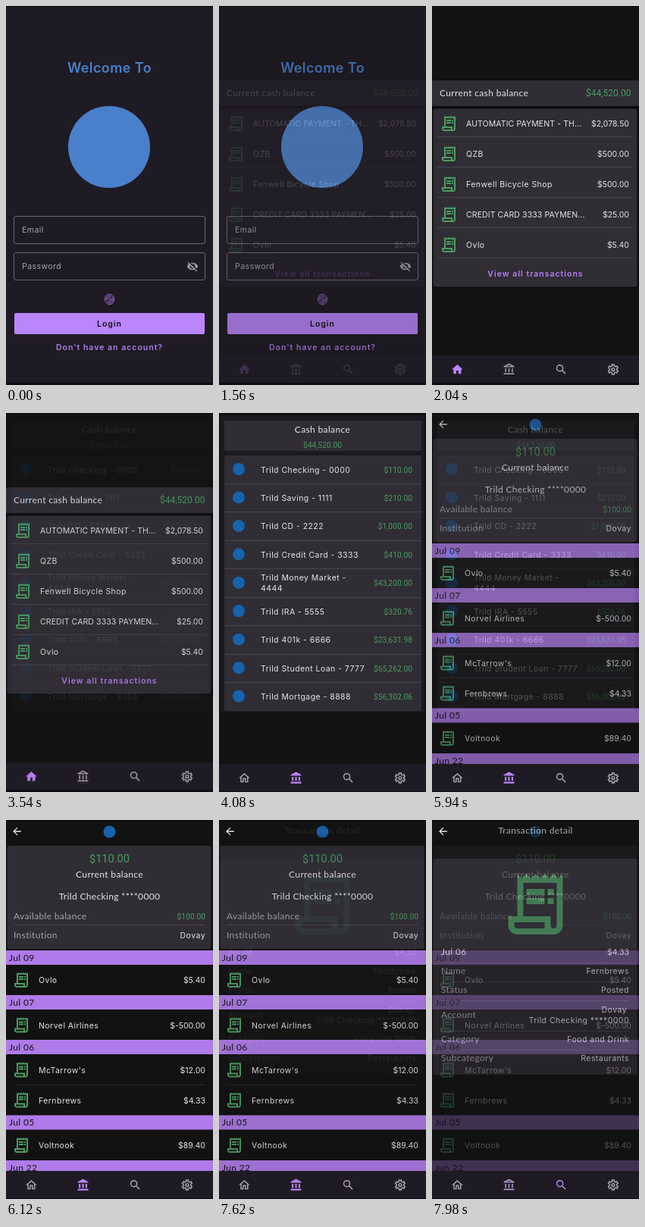
Write an HTML page that moves like this. It is 273 px wide and 500 px high and loops after 8000 ms.

```html
<!DOCTYPE html>
<html lang="en">
<head>
<meta charset="utf-8">
<title>Budget app tour</title>
<style>
  html, body { margin: 0; width: 100%; height: 100%; overflow: hidden; background: #121212; }
  svg { display: block; width: 100vw; height: 100vh; }
  .sans { font: 400 10.5px Inter, sans-serif; letter-spacing: .45px; }
  .tight { font: 400 10.5px Inter, sans-serif; letter-spacing: .1px; }
  .sum { font: 400 10.5px Inter, sans-serif; }
  .bold { font: 600 10.5px Inter, sans-serif; letter-spacing: 1px; }
  .title { font: 600 18px Inter, sans-serif; letter-spacing: .4px; }
  .label { font: 400 12px Lato, sans-serif; letter-spacing: .35px; }
  .cash { font: 400 10.3px Roboto, sans-serif; }
  .mid { font: 400 12px Roboto, sans-serif; }
  .big { font: 400 14.6px Roboto, sans-serif; }
</style>
</head>
<body>
<svg id="stage" viewBox="0 0 273 500"></svg>
<script>
const BG = '#121212', BAR = '#1f1b24', CARD = '#302d34', LINE = '#47444c';
const WHITE = '#e6e5e7', GREY = '#a5a3a8', GREEN = '#4c9c62', PURPLE = '#bb86fc';
const BAND = '#ae7be8', BANK_BLUE = '#1763ac', BLUE = '#4a80ca';
const BANK = 'Trild', BRANCH = 'Dovay';

const rect = (x, y, w, h, fill, r = 0) =>
  `<rect x="${x}" y="${y}" width="${w}" height="${h}" rx="${r}" fill="${fill}"/>`;
const box = (x, y, w, h) =>
  `<rect x="${x}" y="${y}" width="${w}" height="${h}" rx="2.5" fill="none" stroke="#6b676f"/>`;
const dot = (x, y, r, fill) => `<circle cx="${x}" cy="${y}" r="${r}" fill="${fill}"/>`;
const text = (s, x, y, cls, fill = WHITE, anchor = 'start') =>
  `<text x="${x}" y="${y}" class="${cls}" fill="${fill}" text-anchor="${anchor}">${s}</text>`;
const center = (s, y, cls, fill) => text(s, 136.5, y, cls, fill, 'middle');
const right = (s, x, y, cls, fill) => text(s, x, y, cls, fill, 'end');
const rule = (x, y, w) => rect(x, y, w, 1, LINE);

// Icons are drawn in a 24-unit box around (12, 12).
const icon = (art, x, y, size, color) =>
  `<g transform="translate(${x - size / 2} ${y - size / 2}) scale(${size / 24})" fill="${color}" color="${color}">${art}</g>`;
const fillPath = d => `<path fill-rule="evenodd" d="${d}"/>`;
const stroke = (d, w = 2) => `<path d="${d}" fill="none" stroke="currentColor" stroke-width="${w}"/>`;

function gear() {
  const pts = [];
  for (let i = 0; i < 6; i++) {
    for (const [turn, r] of [[-.27, 6.8], [-.2, 9.2], [.2, 9.2], [.27, 6.8]]) {
      const a = (i + turn) * Math.PI / 3;
      pts.push((12 + r * Math.sin(a)).toFixed(2) + ' ' + (12 - r * Math.cos(a)).toFixed(2));
    }
  }
  return stroke(`M${pts.join('L')}Z`) + '<circle cx="12" cy="12" r="2.6" fill="none" stroke="currentColor" stroke-width="2"/>';
}

const ridge = r =>
  `<ellipse cx="12" cy="12" rx="${r}" ry="${r * 1.1}" fill="none" stroke="currentColor" stroke-width="1.3" stroke-dasharray="${r * 2.6} 1.6"/>`;

const art = {
  receipt: fillPath('M19.5 3.5L18 2l-1.5 1.5L15 2l-1.5 1.5L12 2l-1.5 1.5L9 2 7.5 3.5 6 2v14H3v3c0 1.66 1.34 3 3 3h12c1.66 0 3-1.34 3-3V2zM15 20H6c-.55 0-1-.45-1-1v-1h10zM19 19c0 .55-.45 1-1 1s-1-.45-1-1v-3H8V5h11zM9 7h6v2H9zM16 7h2v2h-2zM9 10h6v2H9zM16 10h2v2h-2z'),
  home: fillPath('M10 20v-6h4v6h5v-8h3L12 3 2 12h3v8z'),
  homeLine: fillPath('M12 5.7l5 4.5V18h-2v-6H9v6H7v-7.8zM12 3L2 12h3v8h6v-6h2v6h6v-8h3z'),
  bank: fillPath('M4 10h3v7H4zM10 10h3v7h-3zM16 10h3v7h-3zM2 19h19v3H2zM11.5 1L2 6v2h19V6z'),
  bankLine: fillPath('M4.5 10h2v7h-2zM10.5 10h2v7h-2zM16.5 10h2v7h-2zM2 19h19v2H2zM11.5 3.3L16.7 6H6.3zM11.5 1L2 6v2h19V6z'),
  search: stroke('M4 9.5a5.5 5.5 0 1 1 11 0a5.5 5.5 0 1 1-11 0M13.5 13.5L19.7 19.7'),
  gear: gear(),
  back: stroke('M20 12H5M12.7 4.7L5.4 12l7.3 7.3'),
  eyeOff: fillPath('M1 12C4.5 2.5 19.5 2.5 23 12C19.5 21.5 4.5 21.5 1 12zM7 12a5 5 0 1 0 10 0a5 5 0 1 0-10 0') +
    '<circle cx="12" cy="12" r="3"/>' +
    `<path d="M4.2 2.2L21.8 19.8" stroke="${BAR}" stroke-width="2"/>` + stroke('M2.6 3.6L20.4 21.4'),
  finger: [1.7, 4.1, 6.5, 8.9].map(ridge).join('')
};

function nav(active, y) {
  const icons = [
    active === 0 ? art.home : art.homeLine,
    active === 1 ? art.bank : art.bankLine,
    art.search, art.gear
  ];
  return rect(0, y, 273, 36, BAR) + rect(0, y + 36, 273, 464 - y, '#0d0c0f') +
    icons.map((a, i) => icon(a, 33.4 + 68.5 * i, y + 18.5, 17.5, i === active ? PURPLE : '#aaa8ad')).join('');
}

const base = color => rect(0, 0, 273, 500, color) + rect(0, 0, 273, 1, '#09090a');
const receipt = (x, y) => icon(art.receipt, x, y, 24, GREEN);
const back = () => icon(art.back, 14.5, 15, 16, WHITE);

function login() {
  return base(BAR) + rect(0, 497, 273, 3, '#0d0c0f') +
    center('Welcome To', 88, 'title', BLUE) +
    dot(136, 186, 54, BLUE) +
    box(10.5, 277.5, 252, 36) + text('Email', 21, 298.5, 'sans', GREY) +
    box(10.5, 325.5, 252, 36) + text('Password', 21, 346.5, 'sans', GREY) +
    icon(art.eyeOff, 246, 343.5, 16, '#9b989e') +
    icon(art.finger, 136.5, 387, 16.5, '#a678e0') +
    rect(11, 405, 251, 28, PURPLE, 2) +
    center('Login', 422.5, 'bold', '#121212') +
    center("Don't have an account?", 454, 'bold', '#b07fee');
}

function overview() {
  const rows = [
    ['AUTOMATIC PAYMENT - TH...', '$2,078.50'], ['QZB', '$500.00'],
    ['Fenwell Bicycle Shop', '$500.00'], ['CREDIT CARD 3333 PAYMEN...', '$25.00'], ['Ovlo', '$5.40']
  ];
  return base(BG) + rect(0, 97, 273, 275, '#0c0c0d') +
    rect(0, 98, 273, 34, CARD, 2) +
    text('Current cash balance', 10, 119, 'label') + right('$44,520.00', 262.5, 119, 'mid', GREEN) +
    rect(1.5, 135.5, 269, 235, CARD, 3) +
    rows.map(([name, sum], i) => {
      const y = 155 + 40 * i;
      return receipt(22, y) + text(name, 45, y + 4, i % 3 ? 'sans' : 'tight') +
        right(sum, 260, y + 4, 'sum') + rule(7, y + 17, 258);
    }).join('') +
    center('View all transactions', 356.5, 'bold', '#b681fa') + nav(0, 461);
}

function accounts() {
  const rows = [
    ['Checking - 0000', '$110.00'], ['Saving - 1111', '$210.00'], ['CD - 2222', '$1,000.00'],
    ['Credit Card - 3333', '$410.00'], ['Money Market -', '$43,200.00'], ['IRA - 5555', '$320.76'],
    ['401k - 6666', '$23,631.98'], ['Student Loan - 7777', '$65,262.00'], ['Mortgage - 8888', '$56,302.06']
  ];
  return base(BG) + rect(2, 3, 269, 392, '#1c1920') +
    rect(7, 10, 260, 40, CARD, 2) +
    center('Cash balance', 26, 'label') + center('$44,520.00', 45.5, 'cash', GREEN) +
    rect(7, 56, 260, 337, CARD, 2) +
    rows.map(([name, sum], i) => {
      const y = 74.5 + 37.45 * i, full = `${BANK} ${name}`;
      const label = i === 4
        ? text(full, 55, y - 3.5, 'sans') + text('4444', 55, y + 11, 'sans')
        : text(full, 55, y + 4, 'sans');
      return dot(26, y - .5, 8, BANK_BLUE) + label + right(sum, 255, y + 4, 'cash', GREEN) +
        (i < 8 ? rule(7, Math.round(y + 18.5), 260) : '');
    }).join('') + nav(1, 463);
}

function account() {
  const bands = [['Jul 09', 172], ['Jul 07', 231], ['Jul 06', 290], ['Jul 05', 389.5], ['Jun 22', 449]];
  const rows = [
    ['Ovlo', '$5.40', 211], ['Norvel Airlines', '$-500.00', 270.5], ['McTarrow\'s', '$12.00', 329.5],
    ['Fernbrews', '$4.33', 369.5], ['Voltnook', '$89.40', 429]
  ];
  return base(BG) + back() + dot(136.5, 15.5, 8, BANK_BLUE) +
    rect(1.5, 34, 269, 136, CARD, 3) +
    center('$110.00', 56, 'big', GREEN) + center('Current balance', 76, 'label') +
    center(`${BANK} Checking ****0000`, 105, 'label') +
    text('Available balance', 10, 130.5, 'label', GREY) + right('$100.00', 263, 131, 'cash', GREEN) +
    rule(10, 138, 253) +
    text('Institution', 10, 156, 'label', GREY) + right(BRANCH, 263, 156, 'sans') +
    bands.map(([day, y]) => rect(0, y, 273, 19, BAND) + text(day, 4, y + 13.5, 'label', '#121212')).join('') +
    rect(10, 349, 253, 1, '#26252a') +
    rows.map(([name, sum, y]) => receipt(20, y) + text(name, 43, y + 4, 'sans') + right(sum, 263, y + 4, 'sum')).join('') +
    nav(1, 463);
}

function detail() {
  const rows = [
    ['Name', 'Fernbrews', 203], ['Status', 'Posted', 228], ['Account', '', 260.5],
    ['Category', 'Food and Drink', 293], ['Subcategory', 'Restaurants', 318]
  ];
  return base(BG) + back() + center('Transaction detail', 17.5, 'label') +
    rect(1.5, 51, 269, 285, CARD, 3) +
    icon(art.receipt, 136.5, 111, 96, GREEN) +
    text('Jul 06', 12, 178, 'label') + right('$4.33', 260, 178, 'sum') +
    [188, 213, 238, 278, 303].map(y => rule(12, y, 248)).join('') +
    rows.map(([name, value, y]) => text(name, 12, y, 'label', '#b5b2b8') + right(value, 260, y, 'sans')).join('') +
    right(BRANCH, 257, 253.5, 'sans') + right(`${BANK} Checking ****0000`, 260, 268, 'sans') +
    nav(2, 463);
}

const LOOP = 8000, STEP = 60;
const screens = [[login, -LOOP], [overview, 1500], [accounts, 3540], [account, 5580], [detail, 7620]];
const stage = document.getElementById('stage');
stage.innerHTML = screens.map(([draw]) => `<g>${draw()}</g>`).join('');
const layers = [...stage.children];

// Each screen fades in over the one before, in ten equal steps.
function show(t) {
  layers.forEach((layer, i) => {
    const n = Math.floor((t - screens[i][1]) / STEP) + 1;
    const alpha = Math.max(0, Math.min(1, n / 10));
    layer.setAttribute('opacity', alpha);
    layer.setAttribute('visibility', alpha ? 'visible' : 'hidden');
  });
}

const start = performance.now();
function tick() {
  show((performance.now() - start) % LOOP);
  requestAnimationFrame(tick);
}
tick();
</script>
</body>
</html>
```
